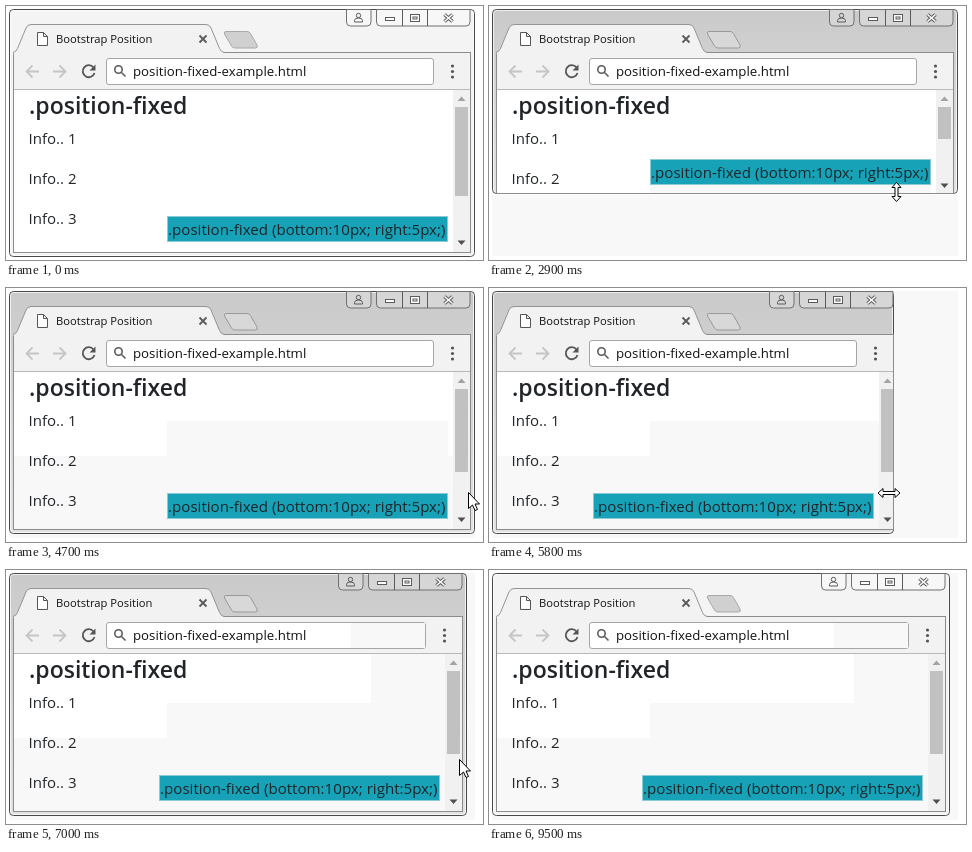
An HTML page that plays this animation: 477 px wide and 254 px high, repeating every 9600 ms.

```html
<!DOCTYPE html>
<html lang="en">
<head>
<meta charset="utf-8">
<title>Fixed position demo</title>
<style>
  html, body { margin: 0; width: 100%; height: 100%; overflow: hidden; background: #fff; }
  svg { display: block; width: 100vw; height: 100vh; font-family: "Open Sans", "Noto Sans", sans-serif; }
  text { fill: #212529; }
  .chrome { fill: #111; }
  .crisp { shape-rendering: crispEdges; }
  .worn { fill: #f8f8f8; shape-rendering: crispEdges; }
  .line { fill: none; stroke: #5a5a5a; }
  #frame { fill: #f4f4f4; stroke: #484848; }
  #newTab { fill: #d0d0d0; stroke: #a8a8a8; }
  .button { fill: #f7f7f7; stroke: #707070; }
  .active #frame { fill: url(#glass); }
  .active #newTab { fill: #d8d8d8; stroke: #999; }
  .active .button { fill: #d6d6d6; }
  #cursors > path { fill: #fff; stroke: #000; stroke-linejoin: round; }
</style>
</head>
<body>
<svg id="stage" viewBox="0 0 477 254">
  <defs>
    <linearGradient id="glass" x2="0" y2="1">
      <stop stop-color="#cacaca"/>
      <stop offset=".25" stop-color="#d0d0d0"/>
      <stop offset="1" stop-color="#e2e2e2"/>
    </linearGradient>
    <clipPath id="viewClip"><rect id="viewRect" x="8" y="84"/></clipPath>
    <clipPath id="windowClip"><rect id="windowRect" x="8" y="46"/></clipPath>
    <clipPath id="addressClip"><rect id="addressRect" x="101" y="53" height="25"/></clipPath>
  </defs>

  <rect id="wornBelow" class="worn" x="3" width="466"/>
  <rect id="wornBeside" class="worn" y="3" height="247"/>

  <rect id="frame" x="3.5" y="3.5" rx="4"/>
  <rect id="shine" x="4.5" y="4.5" rx="3" fill="none" stroke="#fff" stroke-opacity=".7"/>

  <g id="caption">
    <path class="button" d="M340.5 3.5V16q0 4 4 4H361q4 0 4-4V3.5z"/>
    <path class="button" d="M370.5 3.5V16q0 4 4 4H460q4 0 4-4V3.5z"/>
    <g class="line">
      <path d="M396.5 4V20M421.5 4V20"/>
      <circle cx="352.5" cy="9.5" r="2.2"/>
      <path d="M348.5 16v-1.5q0-2.5 4-2.5t4 2.5V16z"/>
      <rect x="379.5" y="11.5" width="9" height="3" fill="#fff"/>
      <rect x="404.5" y="8.5" width="9" height="7" fill="#fff"/>
      <rect x="407" y="11" width="4" height="2"/>
      <path d="M438.5 8.5l8 7m0-7l-8 7" stroke-width="3.6"/>
    </g>
    <path d="M438.5 8.5l8 7m0-7l-8 7" stroke="#fff" stroke-width="1.6"/>
  </g>

  <path id="newTab" d="M220 25.5H241q2.5 0 3.5 2L251 39q1 3-1.500 3H229q-2.500 0-3.500-2L218.500 28q-1-2.500 1.500-2.500z"/>
  <g clip-path="url(#windowClip)">
    <rect x="8" y="46" width="470" height="38" fill="#f2f2f2"/>
    <rect class="crisp" x="8" y="84" width="470" height="170" fill="#fff"/>
    <rect class="crisp" x="8" y="83" width="470" height="1" fill="#b8b8b8"/>
  </g>
  <path id="inner" class="crisp" fill="none" stroke="#8c8c8c"/>
  <path d="M7 46.5Q10 46 11.5 42.5L20 22q1.5-3.500 5-3.500H200q3.500 0 5 3.500L213.500 42.500Q215 46 218 46.500V48H8z" fill="#f2f2f2"/>
  <path class="line" style="stroke:#949494" d="M7 46.5Q10 46 11.5 42.5L20 22q1.5-3.500 5-3.500H200q3.500 0 5 3.500L213.500 42.500Q215 46 218 46.500"/>
  <path d="M31.5 26.5H37.5L41.5 30.5V39.5H31.5zM37.5 26.5V30.5H41.5" fill="#fff" stroke="#555"/>
  <text class="chrome" x="50" y="37" font-size="11.2">Bootstrap Position</text>
  <path class="line" stroke-width="1.8" d="M193.5 29.5l7 7m0-7l-7 7"/>

  <g fill="none" stroke-width="1.8">
    <path stroke="#c6c6c6" d="M33 65.5H20.5M26.5 59.5l-6 6 6 6M47 65.5H59.5M53.5 59.5l6 6-6 6"/>
    <path stroke="#555" d="M87.5 61.5A6 6 0 1 0 88.5 67"/>
  </g>
  <path fill="#555" d="M89.5 58.5V64.5H83.5z"/>
  <rect id="address" x="100.5" y="52.5" height="26" rx="2.5" fill="#fff" stroke="#a6a6a6"/>
  <rect id="wornAddress" class="worn" y="53" width="90" height="25" clip-path="url(#addressClip)"/>
  <g class="line" stroke-width="1.6"><circle cx="112.5" cy="63.5" r="3.7"/><path d="M115.5 66.5l4 4"/></g>
  <text class="chrome" x="127" y="70" font-size="13.26">position-fixed-example.html</text>
  <g id="menu" fill="#555">
    <circle cx="446.5" cy="60" r="1.6"/><circle cx="446.5" cy="65.5" r="1.6"/><circle cx="446.5" cy="71" r="1.6"/>
  </g>

  <g clip-path="url(#windowClip)">
    <g clip-path="url(#viewClip)">
      <rect id="wornRows" class="worn" x="8" width="460" height="254"/>
      <rect id="wornBox" class="worn" x="161" width="281" height="254"/>
      <rect id="wornSide" class="worn" y="84" width="110" height="170"/>
      <g id="content">
        <text x="23" y="108" font-size="23" font-weight="600">.position-fixed</text>
      </g>
      <g id="fixedBox">
        <rect x="161.5" y="210.5" width="280" height="25" fill="#17a2b8" stroke="#8ccbd6"/>
        <text x="162" y="229" font-size="15.1">.position-fixed (bottom:10px; right:5px;)</text>
      </g>
    </g>
    <g id="scrollbar">
      <rect id="track" class="crisp" x="447" y="84" width="17" fill="#f1f1f1"/>
      <path id="upArrow" d="M451.5 95l4-4.5 4 4.5z"/>
      <rect id="thumb" class="crisp" x="449" width="13"/>
      <path id="downArrow" d="M451.5 234.5l4 4.5 4-4.5z"/>
    </g>
  </g>

  <g id="cursors">
    <path id="arrow" d="M.5 .5V16.5L4.5 13 7 18.5 9.5 17.5 7 12H11.5z"/>
    <path id="vertical" d="M.5-9.5L5-4.5H2V4.5H5L.5 9.5-4 4.5H-1V-4.500H-4z"/>
    <path id="horizontal" d="M-11 0L-6-4.5V-1.5H6V-4.5L11 0 6 4.5V1.5H-6V4.5z"/>
  </g>
</svg>

<script>
const LOOP = 9600, STEP = 100;
const FULL = { right: 469, bottom: 250 };
const VIEW_TOP = 84, CONTENT_HEIGHT = 235;
const $ = id => document.getElementById(id);

function setAttrs(node, attrs) {
  for (const name in attrs) node.setAttribute(name, attrs[name]);
}
const set = (id, attrs) => setAttrs($(id), attrs);
const shift = (id, x, y) => set(id, { transform: `translate(${x} ${y})` });

const smooth = p => p * p * (3 - 2 * p);
const easeOut = p => 1 - (1 - p) ** 1.65;

// The first step of a move already shows some progress; the last one completes it.
function progress(t, start, end) {
  return Math.min(1, Math.max(0, (t - start + STEP) / (end - start + STEP)));
}
function follow(t, value, moves) {
  for (const [start, end, to, ease] of moves) {
    if (t >= start) value += (to - value) * ease(progress(t, start, end));
  }
  return value;
}

const bottomAt = t => follow(t, FULL.bottom, [[2500, 3100, 172, smooth], [3400, 4000, 245, smooth]]);
const rightAt = t => follow(t, FULL.right, [[5600, 6000, 387, easeOut], [6200, 6600, 461, smooth]]);
const scrollAt = t => follow(t, 0, [[7400, 7800, 1, smooth], [8000, 8400, 0, smooth]]);
const lagging = (track, t, amount) => Math.round(track(t) - amount * (track(t) - track(t - STEP)));

// start, end, x, y, shape
const legs = [
  [800, 1500, 424, 228, "arrow"], [1600, 1700, 410, 245, "vertical"],
  [2100, 2200, 407, 245, "vertical"], [2500, 4000, 408, 243, "vertical"],
  [4100, 4300, 442, 209, "arrow"], [4400, 4700, 462, 204, "arrow"],
  [5000, 5100, 464, 204, "arrow"], [5200, 5300, 465, 205, "horizontal"],
  [5600, 6600, 457, 205, "horizontal"], [6700, 6800, 458, 190, "arrow"],
  [7000, 7000, 453, 189, "arrow"], [7100, 7200, 447, 160, "arrow"],
  [7400, 7800, 447, 201, "arrow"], [8000, 8400, 447, 160, "arrow"],
  [8700, 8900, 465, 152, "arrow"], [9000, 9000, 465, 152, ""]
];

function cursorAt(t, right, bottom) {
  const cursor = { x: 453, y: 140, shape: "" };
  for (const [start, end, x, y, shape] of legs) {
    if (t < start) break;
    const p = progress(t, start, end);
    cursor.x += (x - cursor.x) * p;
    cursor.y += (y - cursor.y) * p;
    cursor.shape = shape;
  }
  if (t >= 2500 && t <= 4000) cursor.y = bottom - 1;
  if (t >= 5600 && t <= 6600) cursor.x = right - 5;
  return cursor;
}

function drawWindow(right, bottom, pageRight, pageBottom, chromeRight) {
  set("frame", { width: right - 4, height: bottom - 3 });
  set("shine", { width: right - 6, height: bottom - 5 });
  // Lagging contents may reach into the border, but never past it.
  const innerRight = Math.min(pageRight - 5, right - 1);
  const innerBottom = Math.min(pageBottom - 4, bottom);
  set("windowRect", { width: innerRight - 8, height: innerBottom - 46 });
  set("inner", { d: `M7.5 46.5H${innerRight + .5}V${innerBottom + .5}H7.5z` });
  const dx = chromeRight - FULL.right;
  shift("caption", dx, 0);
  shift("menu", dx, 0);
  set("address", { width: 327 + dx });
  set("addressRect", { width: 326 + dx });
}

function drawPage(t, right, bottom, cursor) {
  const dx = right - FULL.right, dy = bottom - FULL.bottom;
  const height = bottom - 4 - VIEW_TOP;
  const scroll = scrollAt(t);
  set("viewRect", { width: right - 30, height });
  shift("content", 0, -Math.round(scroll * (CONTENT_HEIGHT - height)));
  shift("fixedBox", dx, dy);

  const trackLength = height - 33;
  const thumbLength = Math.max(17, trackLength * height / CONTENT_HEIGHT);
  const thumbTop = 101 + scroll * (trackLength - thumbLength);
  const hovered = cursor.shape === "arrow" && cursor.x >= right - 20 && cursor.x < right - 7
    && cursor.y >= thumbTop && cursor.y < thumbTop + thumbLength;
  const dragged = t >= 7400 && t < 8400;
  shift("scrollbar", dx, 0);
  set("track", { height });
  set("thumb", { y: thumbTop, height: thumbLength, fill: dragged ? "#787878" : hovered ? "#a8a8a8" : "#c1c1c1" });
  set("upArrow", { fill: scroll > 0 ? "#505050" : "#a3a3a3" });
  set("downArrow", { fill: scroll < 1 ? "#505050" : "#a3a3a3" });
  shift("downArrow", 0, dy);
}

// Areas once crossed by a moving edge stay slightly off white.
function drawWorn(t, right, bottom) {
  const lowest = t < 2500 ? 999 : t < 3400 ? bottom : 172;
  const nearest = t < 5600 ? 999 : t < 6200 ? right : 387;
  const rows = lowest - 4, side = nearest - 22;
  set("wornBelow", { y: rows, height: Math.max(0, 250 - rows) });
  set("wornBeside", { x: side, width: Math.max(0, 469 - side) });
  set("wornRows", { y: rows });
  set("wornBox", { y: lowest - 39 });
  set("wornSide", { x: side });
  set("wornAddress", { x: side - 20 });
}

function draw(time) {
  const t = Math.floor(time % LOOP / STEP) * STEP;
  const right = Math.round(rightAt(t)), bottom = Math.round(bottomAt(t));
  const pageRight = lagging(rightAt, t, .4), pageBottom = lagging(bottomAt, t, .35);
  const cursor = cursorAt(t, right, bottom);

  $("stage").classList.toggle("active", t >= 2500 && t < 9500);
  drawWindow(right, bottom, pageRight, pageBottom, lagging(rightAt, t, .25));
  drawPage(t, pageRight, pageBottom, cursor);
  drawWorn(t, pageRight, pageBottom);
  for (const shape of $("cursors").children) {
    shape.style.display = shape.id === cursor.shape ? "" : "none";
  }
  shift("cursors", Math.round(cursor.x), Math.round(cursor.y));
}

for (let i = 1; i <= 5; i++) {
  const row = document.createElementNS($("stage").namespaceURI, "text");
  row.textContent = `Info.. ${i}`;
  setAttrs(row, { x: 22.5, y: 98 + 40 * i, "font-size": 15 });
  $("content").append(row);
}

const begin = performance.now();
function tick() {
  draw(performance.now() - begin);
  requestAnimationFrame(tick);
}
tick();
</script>
</body>
</html>
```
